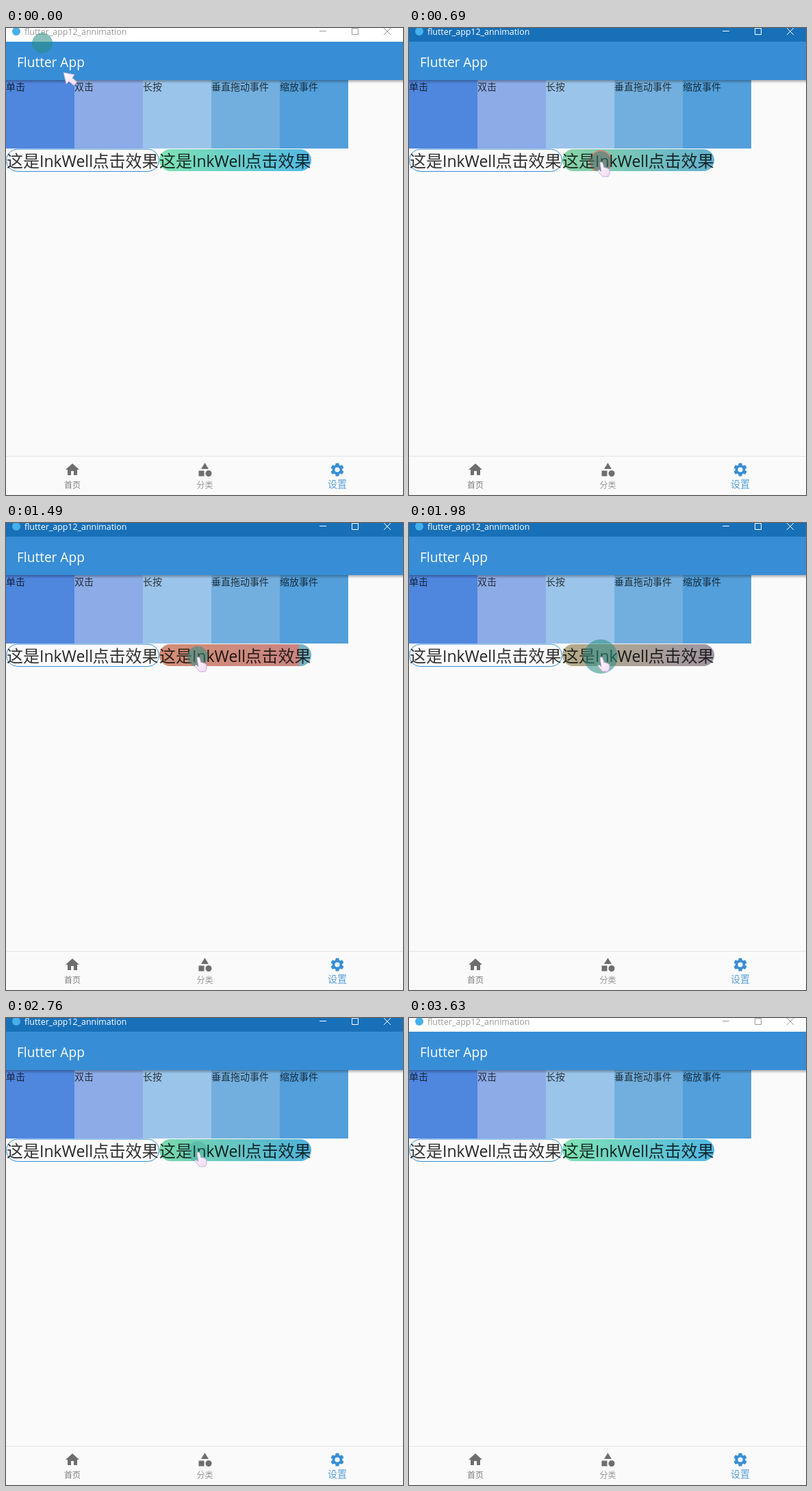
Write an HTML page that moves like this. It is 580 px wide and 682 px high and loops after 3740 ms.

```html
<!DOCTYPE html>
<html lang="zh">
<head>
<meta charset="utf-8">
<style>
  html, body { margin: 0; width: 580px; height: 682px; overflow: hidden; background: #fafafa; }
  svg { display: block; }
  text { font: 300 14px "Noto Sans CJK SC", "Noto Sans CJK", sans-serif; fill: #000; fill-opacity: .74; }
  .latin { font-family: "Open Sans", "Noto Sans", sans-serif; font-weight: 400; fill-opacity: 1; }
  .big text { font-size: 24px; fill-opacity: .8; }
  .big .latin { font-size: 23px; fill-opacity: .86; }
  .nav { text-anchor: middle; }
</style>
</head>
<body>
<svg width="580" height="682" viewBox="0 0 580 682">
  <defs>
    <linearGradient id="mint"><stop stop-color="#7fe3b2"/><stop offset="1" stop-color="#52b8e4"/></linearGradient>
    <linearGradient id="shade" x2="0" y2="1"><stop stop-opacity=".3"/><stop offset="1" stop-opacity="0"/></linearGradient>
    <linearGradient id="skin" x2="1" y2="1"><stop stop-color="#fff"/><stop offset="1" stop-color="#f1d8f2"/></linearGradient>
    <clipPath id="pill"><rect x="224" y="177" width="222" height="32" rx="16"/></clipPath>
    <g id="phrase" class="big">
      <text x="1" y="203">这是</text>
      <text x="49" y="203" class="latin">InkWell</text>
      <text x="126.5" y="203">点击效果</text>
    </g>
  </defs>

  <g id="tiles"></g>
  <rect y="76" width="580" height="5" fill="url(#shade)"/>
  <rect id="bar" width="580" height="20"/>
  <circle cx="15" cy="5" r="6" fill="#45b0ea"/>
  <text id="caption" class="latin" x="27" y="10" style="font-size:12.4px">flutter_app12_annimation</text>
  <path id="buttons" d="M458 4.500h10M505.500.5h9v9h-9zM552 0l10 10M562 0l-10 10" fill="none"/>
  <rect y="20" width="580" height="56" fill="#388ed6"/>
  <text class="latin" x="16" y="57" style="font-size:19.1px;fill:#fff">Flutter App</text>

  <rect x=".5" y="177" width="223" height="32.500" rx="16.200" fill="none" stroke="#388ed6"/>
  <use href="#phrase"/>
  <g clip-path="url(#pill)">
    <rect x="224" y="177" width="222" height="32" fill="url(#mint)"/>
    <rect id="hover" x="224" y="177" width="222" height="32" opacity=".04"/>
    <rect id="glow" x="224" y="177" width="222" height="32" fill="#faaa78"/>
    <circle id="splash" cx="280" cy="195" fill="#f07064"/>
  </g>
  <use href="#phrase" x="223"/>

  <path d="M0 625.500h580" stroke="#e4e6e8"/>
  <g fill="#6e6e6e">
    <path transform="translate(85 633)" d="M10 20v-6h4v6h5v-8h3L12 3 2 12h3v8z"/>
    <path transform="translate(278.500 633)" d="M12 2l-5.500 9h11zM3 13.500h8v8H3zM17.500 13a4.500 4.500 0 1 0 .01 0z"/>
    <path transform="translate(472 633)" fill="#388ed6" d="M19.140 12.940c.04-.3.06-.61.06-.94 0-.32-.02-.64-.07-.94l2.030-1.580c.18-.14.23-.41.12-.61l-1.920-3.320c-.12-.22-.37-.29-.59-.22l-2.390.96c-.5-.38-1.030-.7-1.620-.94l-.36-2.540c-.04-.24-.24-.41-.48-.41h-3.840c-.24 0-.43.17-.47.41l-.36 2.540c-.59.24-1.130.57-1.620.94l-2.390-.96c-.22-.08-.47 0-.59.22L2.740 8.870c-.12.21-.08.47.12.61l2.030 1.580c-.05.3-.09.63-.09.94s.02.64.07.94l-2.030 1.580c-.18.14-.23.41-.12.61l1.920 3.320c.12.22.37.29.59.22l2.390-.96c.5.38 1.030.7 1.620.94l.36 2.540c.05.24.24.41.48.41h3.840c.24 0 .44-.17.47-.41l.36-2.540c.59-.24 1.130-.56 1.620-.94l2.390.96c.22.08.47 0 .59-.22l1.920-3.320c.12-.22.07-.47-.12-.61zM12 15.600a3.600 3.600 0 1 1 0-7.200 3.600 3.600 0 0 1 0 7.200z"/>
  </g>
  <g class="nav">
    <text x="97" y="672" style="font-size:12px;fill:#555">首页</text>
    <text x="290.500" y="672" style="font-size:12px;fill:#777">分类</text>
    <text x="484" y="671" style="fill:#388ed6;fill-opacity:.85">设置</text>
  </g>

  <circle id="halo" fill="#288c82"/>
  <g id="pointer" fill="url(#skin)" stroke="#b9a0d6" stroke-width=".8" stroke-linejoin="round">
    <path id="arrow" d="M0 0l16 3-3 5 7 6-5 5-7-6-4 4z"/>
    <path id="hand" d="M-1 2q2-3 4 0l2 7q2-2 3 1 2-2 3 1 2-1 2 2l0 5-2 4h-8l-7-8q0-3 3-1l2 2z"/>
  </g>
</svg>
<script>
const $ = id => document.getElementById(id);
const set = (id, attrs) => { for (const k in attrs) $(id).setAttribute(k, attrs[k]); };
const clamp = v => Math.max(0, Math.min(1, v));

const LOOP = 3740, STEPS = 38;
const TAPS = [{ down: 588, up: 1890 }, { down: 2359, up: 2480 }];

$('tiles').innerHTML = [
  ['单击', '#4f86de'], ['双击', '#8cabe7'], ['长按', '#9bc4ea'],
  ['垂直拖动事件', '#72afde'], ['缩放事件', '#529fdb']
].map(([label, color], i) =>
  `<rect x="${i * 100}" y="76" width="100" height="100" fill="${color}"/>
   <text x="${i * 100}" y="91">${label}</text>`).join('');

function drawWindow(t) {
  const active = t > 580 && t < 3500;
  set('bar', { fill: active ? '#1870b8' : '#fff' });
  set('buttons', { stroke: active ? '#fff' : '#999' });
  $('caption').style.fill = active ? '#fff' : '#999';
}

function drawInk(t, tap) {
  const held = Math.min(t, tap.up) - tap.down;
  const since = Math.max(0, t - tap.up);
  const fade = t < tap.down ? 0 : 1 - clamp(since / 200);
  // grows slowly while held, then about 1 px per ms
  const r = Math.min(170, Math.max(0, held) * .1675 + since);
  set('splash', { r, opacity: .68 * fade });
  set('glow', { opacity: .22 * fade * clamp(held / 200) });
}

function drawPointer(t, tap) {
  const enter = (1 - clamp(t / 480)) ** 2;
  const leave = clamp((t - 2860) / 600) ** 2;
  const x = 280 - 196 * enter - 340 * leave;
  const y = 195 - 130 * enter - 315 * leave;
  const over = x > 224 && y > 177;
  const since = t - tap.up;
  const after = since > 0 && since < 500;
  set('halo', {
    cx: x + 31 * (leave - enter),
    cy: y + 43 * (leave - enter),
    r: 15 + (after ? 10 * Math.max(0, 1 - Math.abs(since - 78) / 150) : 0),
    opacity: .55 - (after ? .3 * clamp((since - 100) / 150) : 0)
  });
  set('pointer', { transform: `translate(${x} ${y})` });
  set('arrow', { visibility: over ? 'hidden' : 'visible' });
  set('hand', { visibility: over ? 'visible' : 'hidden' });
  set('hover', { visibility: over ? 'visible' : 'hidden' });
}

function draw(now) {
  const step = Math.min(STEPS - 1, Math.floor((now % LOOP + 20) * STEPS / LOOP));
  const t = step * LOOP / STEPS;
  const tap = TAPS[t < TAPS[1].down ? 0 : 1];
  drawWindow(t);
  drawInk(t, tap);
  drawPointer(t, tap);
}

const start = performance.now();
function tick() {
  draw(performance.now() - start);
  requestAnimationFrame(tick);
}
tick();
</script>
</body>
</html>
```
